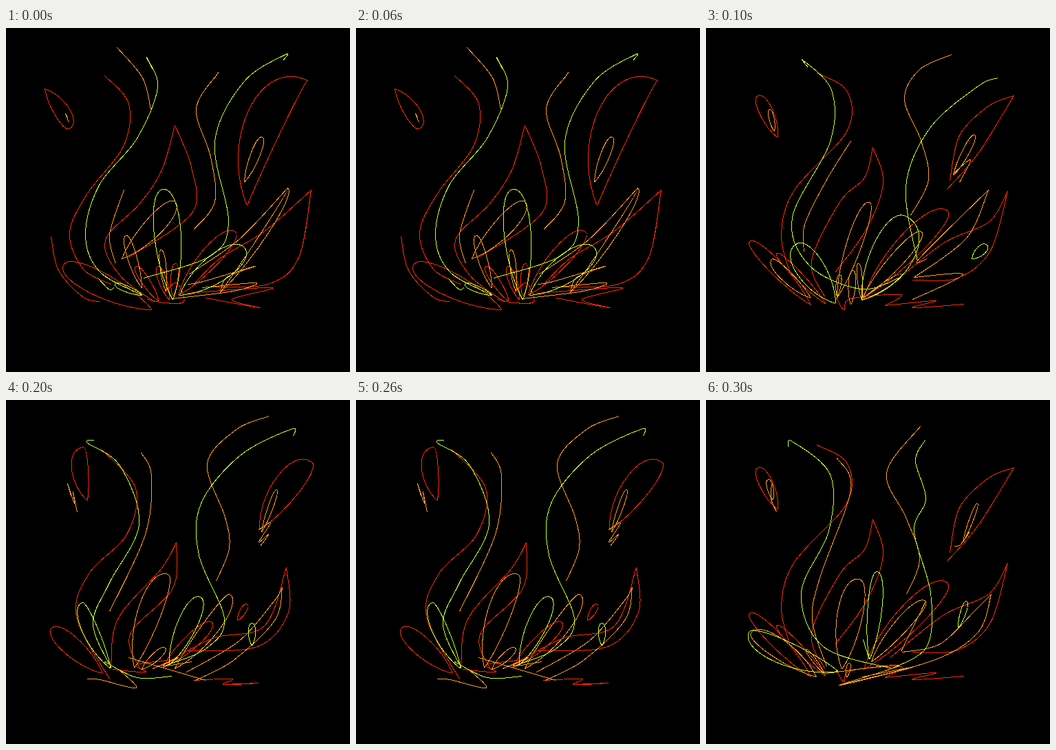
An HTML page that plays this animation: 500x500 px, repeating every 400 ms.

```html
<!DOCTYPE html>
<html lang="en">
<head>
<meta charset="utf-8">
<title>Campfire line drawing</title>
<style>
html, body { margin: 0; height: 100%; overflow: hidden; background: #000; }
svg { display: block; width: 100vw; height: 100vh; }
path { fill: none; stroke-width: 1; shape-rendering: crispEdges; }
</style>
</head>
<body>
<svg viewBox="0 0 500 500"><g id="fire" transform="translate(.5 .5)"></g></svg>
<script>
const HOLD = 100;

// Smooth strand through a few points.
function curve(...n) {
  const at = i => [n[2 * i], n[2 * i + 1]];
  const last = n.length / 2 - 1;
  let d = 'M' + at(0);
  for (let i = 0; i < last; i++) {
    const a = at(i), b = at(i + 1);
    const before = at(Math.max(i - 1, 0)), after = at(Math.min(i + 2, last));
    const c1 = a.map((v, k) => v + (b[k] - before[k]) / 6);
    const c2 = b.map((v, k) => v - (after[k] - a[k]) / 6);
    d += `C${c1} ${c2} ${b}`;
  }
  return d;
}

// Loop from a pointed base to a round tip, bulging to the right and left.
function petal(x, y, tipX, tipY, right, left) {
  const dx = tipX - x, dy = tipY - y, len = Math.hypot(dx, dy);
  const at = (t, side) => [x + dx * t - dy / len * side, y + dy * t + dx / len * side];
  return `M${x},${y}C${at(.35, left)} ${at(1, left)} ${tipX},${tipY}` +
    `C${at(1, right)} ${at(.35, right)} ${x},${y}`;
}

function wideRed() {
  return curve(143, 69, 178, 110, 170, 172, 118, 240, 92, 298, 112, 350, 152, 372) +
    petal(56, 88, 92, 146, 10, -20) +
    curve(216, 398, 165, 359, 144, 308, 193, 256, 226, 206, 245, 141) +
    curve(245, 141, 269, 202, 270, 268, 178, 333) +
    petal(350, 258, 438, 76, -4, -78) +
    curve(270, 375, 310, 335, 375, 295, 443, 235) +
    curve(443, 235, 425, 333, 380, 372, 290, 376) +
    curve(65, 303, 76, 352, 112, 391, 137, 397) +
    petal(212, 409, 83, 344, 22, -25) +
    petal(250, 388, 333, 296, 16, -23) +
    petal(222, 397, 188, 346, 8, -8) +
    petal(237, 395, 220, 346, 8, -8) +
    petal(242, 390, 246, 342, 7, -7) +
    curve(205, 394, 230, 399, 258, 397, 247, 370, 230, 384) +
    curve(262, 385, 386, 377, 328, 394, 368, 406, 290, 392);
}

function wideOrange() {
  return curve(161, 28, 198, 72, 210, 118) +
    curve(303, 72, 307, 66, 276, 117, 297, 187, 303, 252, 272, 293) +
    petal(346, 224, 372, 158, 9, -9) +
    curve(91, 137, 86, 124, 89, 130) +
    curve(171, 235, 150, 300, 159, 342) +
    petal(168, 335, 245, 252, 21, -16) +
    petal(197, 378, 174, 301, 8, -10) +
    petal(232, 383, 225, 322, 6, -6) +
    petal(310, 385, 409, 232, 16, 4) +
    curve(409, 232, 338, 307, 266, 357) +
    curve(264, 372, 286, 368, 361, 346, 320, 362, 311, 385) +
    curve(285, 377, 363, 370, 330, 382, 241, 393);
}

function wideLime() {
  return curve(213, 60, 204, 43, 220, 86, 190, 160, 135, 228, 115, 300, 136, 354, 198, 388) +
    petal(198, 388, 158, 372, 6, -6) +
    curve(402, 47, 406, 38, 345, 78, 303, 165, 323, 280, 298, 330, 200, 363) +
    petal(242, 395, 228, 234, 27, -25) +
    petal(252, 388, 347, 320, 26, -28) +
    curve(134, 364, 150, 380, 157, 376);
}

function swayRed() {
  return curve(161, 65, 205, 92, 204, 150, 128, 235, 109, 300, 122, 357) +
    petal(174, 401, 102, 327, 8, -8) +
    petal(104, 159, 75, 98, 14, -12) +
    curve(172, 390, 153, 338, 195, 251, 230, 217, 242, 173) +
    curve(242, 173, 257, 225, 232, 293, 187, 355) +
    curve(354, 222, 368, 156, 410, 113, 447, 98) +
    curve(447, 98, 395, 182, 349, 235) +
    curve(267, 374, 345, 312, 410, 282, 438, 237) +
    curve(438, 237, 413, 323, 365, 363, 300, 366) +
    petal(152, 402, 63, 310, 15, -12) +
    petal(229, 391, 351, 266, 18, -32) +
    curve(189, 392, 200, 409, 210, 393, 283, 387, 260, 403) +
    curve(260, 403, 333, 396, 300, 406, 375, 401);
}

function swayOrange() {
  return curve(357, 38, 310, 60, 288, 103, 312, 163, 323, 220, 297, 272) +
    curve(210, 164, 175, 220, 143, 285, 142, 325) +
    petal(190, 392, 237, 253, 13, -17) +
    petal(359, 214, 390, 155, 7, -7) +
    curve(359, 211, 384, 191, 368, 224) +
    petal(99, 150, 92, 118, 5, -5) +
    curve(410, 235, 311, 333, 321, 335) +
    curve(410, 235, 378, 305, 302, 362) +
    curve(302, 362, 373, 358, 300, 394) +
    petal(227, 392, 313, 296, 14, -14) +
    petal(152, 392, 95, 336, 8, -14) +
    petal(190, 390, 194, 358, 5, -5) +
    petal(210, 402, 213, 352, 7, -7) +
    petal(226, 395, 221, 342, 5, -5) +
    petal(226, 395, 284, 358, 6, -6);
}

function swayLime() {
  return curve(148, 57, 140, 46, 182, 90, 180, 165, 125, 275, 150, 345, 225, 379, 282, 362) +
    curve(424, 72, 395, 84, 325, 145, 290, 230, 307, 339) +
    petal(226, 395, 290, 273, 52, -30) +
    petal(188, 400, 130, 314, 24, -30) +
    petal(386, 335, 408, 315, 9, -9);
}

function leanRed() {
  return curve(138, 71, 188, 128, 175, 195, 120, 252, 102, 315, 150, 405) +
    petal(118, 146, 112, 68, 6, -26) +
    curve(152, 390, 162, 318, 225, 245, 247, 207) +
    curve(247, 207, 242, 273, 180, 340, 195, 392) +
    petal(368, 188, 444, 90, 16, -36) +
    curve(225, 386, 300, 346, 375, 328, 407, 243) +
    curve(407, 243, 410, 308, 365, 358, 265, 364) +
    petal(140, 397, 66, 331, 18, -19) +
    petal(228, 388, 299, 323, 14, -14) +
    petal(336, 320, 350, 296, 6, -6) +
    curve(155, 391, 202, 395, 190, 384, 254, 376) +
    curve(272, 407, 328, 405, 316, 413, 366, 411, 316, 413);
}

function leanOrange() {
  return curve(382, 23, 335, 42, 292, 92, 318, 170, 324, 215, 305, 263) +
    curve(196, 76, 211, 110, 202, 195, 150, 307) +
    petal(186, 389, 235, 253, 14, -32) +
    petal(371, 192, 393, 130, 5, -5) +
    curve(367, 188, 384, 178, 367, 206, 381, 195, 369, 212) +
    curve(94, 139, 89, 121, 99, 150, 97, 133, 103, 163) +
    curve(262, 395, 338, 350, 389, 292, 401, 272) +
    curve(401, 272, 390, 320, 330, 378, 275, 407) +
    petal(245, 390, 325, 282, 24, -8) +
    curve(118, 405, 136, 406, 189, 418, 163, 391) +
    curve(178, 374, 222, 387, 290, 407) +
    petal(197, 391, 231, 360, 8, -8) +
    curve(213, 390, 250, 374, 228, 386, 270, 380);
}

function leanLime() {
  return curve(128, 58, 118, 62, 165, 95, 193, 180, 150, 265, 126, 325, 152, 388) +
    curve(417, 52, 414, 42, 340, 80, 283, 150, 280, 225, 317, 318, 290, 361, 232, 385) +
    petal(237, 384, 282, 286, 18, -20) +
    petal(152, 390, 110, 294, 8, -22) +
    curve(143, 380, 190, 403, 241, 401) +
    petal(357, 357, 357, 324, 7, -7);
}

function curlOrange() {
  return curve(311, 38, 262, 105, 290, 170, 310, 230, 291, 282) +
    curve(190, 84, 210, 130, 165, 258, 154, 320, 175, 387) +
    petal(197, 391, 222, 260, 20, -29) +
    petal(373, 206, 394, 150, 4, -4) +
    curve(361, 212, 369, 210, 383, 191) +
    petal(97, 145, 90, 115, 6, -6) +
    curve(95, 122, 94, 143, 102, 162) +
    curve(285, 366, 340, 354, 390, 306, 414, 282) +
    curve(414, 282, 395, 337, 330, 378, 193, 414) +
    curve(283, 365, 319, 292) +
    petal(240, 380, 319, 292, 10, -18) +
    petal(160, 402, 65, 338, 24, -14) +
    petal(172, 398, 145, 362, 4, -4) +
    petal(204, 403, 208, 382, 4, -4) +
    curve(174, 397, 280, 385, 194, 414, 300, 388, 227, 402);
}

function curlLime() {
  return curve(119, 68, 125, 60, 180, 108, 178, 190, 138, 280, 170, 358, 270, 390) +
    curve(270, 390, 321, 357, 326, 280, 302, 190, 319, 143, 304, 88, 318, 58) +
    petal(237, 377, 248, 249, 16, -12) +
    petal(192, 394, 62, 337, 14, -32) +
    petal(366, 331, 378, 292, 6, -5) +
    curve(228, 348, 237, 377);
}

const layers = [
  ['#ff2a00', wideRed, swayRed, leanRed, swayRed],
  ['#ff9c1a', wideOrange, swayOrange, leanOrange, curlOrange],
  ['#c4ff1e', wideLime, swayLime, leanLime, curlLime]
].map(([color, ...poses]) => {
  const path = document.createElementNS('http://www.w3.org/2000/svg', 'path');
  path.setAttribute('stroke', color);
  document.getElementById('fire').append(path);
  return { path, shapes: poses.map(draw => draw()) };
});

function render(time) {
  const pose = Math.floor(time / HOLD) % 4;
  for (const { path, shapes } of layers) path.setAttribute('d', shapes[pose]);
}

const start = performance.now();
function tick() {
  render(performance.now() - start);
  requestAnimationFrame(tick);
}
tick();
</script>
</body>
</html>
```
